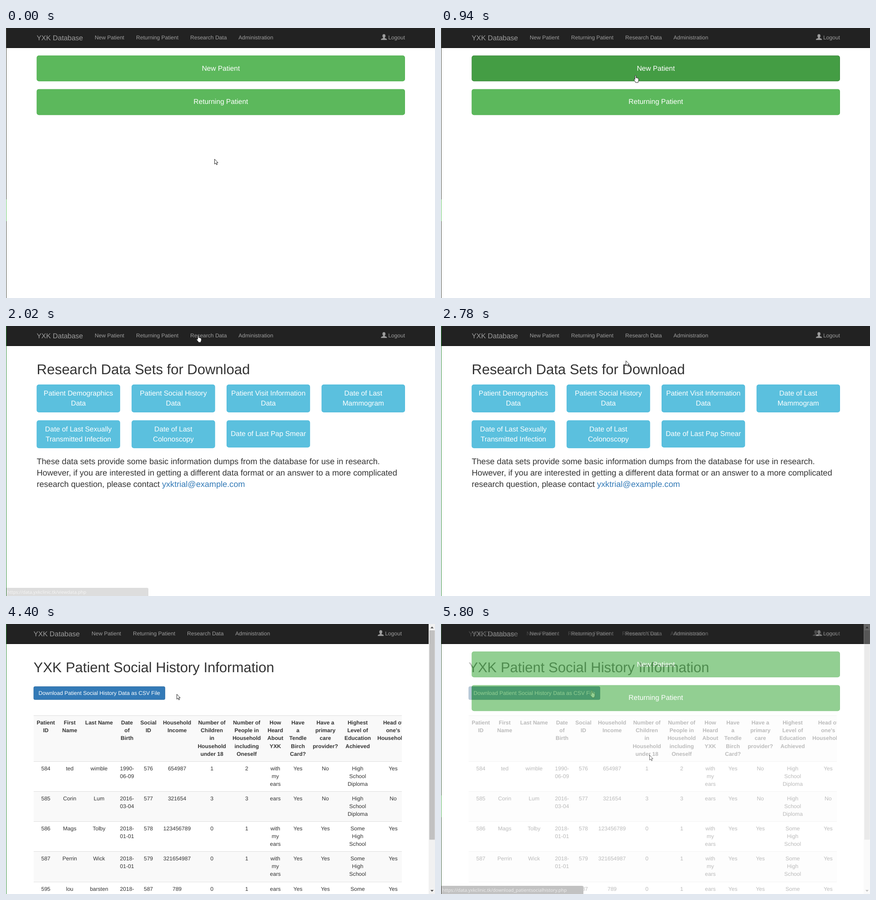
Recreate the animation shown at these times as an HTML page with a canvas. Size 943 px wide and 594 px high, loop 5870 ms.

```html
<!DOCTYPE html>
<html lang="en">
<head>
<meta charset="utf-8">
<title>Patient database</title>
<style>
  html, body { margin: 0; width: 100%; height: 100%; overflow: hidden; background: #fff; }
  canvas { display: block; }
</style>
</head>
<body>
<canvas id="stage" width="943" height="594"></canvas>
<script>
const W = 943, H = 594, LOOP = 5870;
const SANS = '"Liberation Sans", Arial, sans-serif';
const SMALL = 12.06, MEDIUM = 15.5, LEAD = 18.1, TITLE = 31;

const GREEN = ['#5cb85c', '#4cae4c', '#449d44', '#398439'];
const CYAN = ['#5bc0de', '#46b8da', '#31b0d5', '#269abc'];
const BLUE = ['#337ab7', '#2e6da4', '#286090', '#204d74'];

function context(canvas) {
  const c = canvas.getContext('2d');
  c.textRendering = 'geometricPrecision';
  return c;
}
const screen2d = context(document.getElementById('stage'));
const layerCanvas = document.createElement('canvas');
layerCanvas.width = W;
layerCanvas.height = H;
const layer = context(layerCanvas);
let g = screen2d;

function rect(x, y, w, h, color) {
  g.fillStyle = color;
  g.fillRect(x, y, w, h);
}

function text(str, x, y, size, color, align = 'left', weight = '', family = SANS) {
  g.font = `${weight} ${size}px ${family}`;
  g.textAlign = align;
  g.fillStyle = color;
  g.fillText(str, x, y);
}

// Paints a group on its own layer, then adds it with one opacity.
function blend(alpha, paint) {
  if (alpha <= 0) return;
  const below = g;
  g = layer;
  g.clearRect(0, 0, W, H);
  paint();
  g = below;
  g.globalAlpha = alpha;
  g.drawImage(layerCanvas, 0, 0);
  g.globalAlpha = 1;
}

const inside = (p, b) => p.x >= b.x && p.x < b.x + b.w && p.y >= b.y && p.y < b.y + b.h;

// ---- Page contents ----

const box = (x, y, w, h, palette, radius, size, lines) => ({ x, y, w, h, palette, radius, size, lines });
const info = (col, y, h, lines) => box(67.4 + col * 208.75, y, 183.4, h, CYAN, 5, MEDIUM, lines);

const pages = [
  {
    shift: 0,
    buttons: [
      box(67.4, 60.6, 809.6, 56.6, GREEN, 5, MEDIUM, [['New Patient', 94]]),
      box(67.4, 134.4, 809.6, 57, GREEN, 5, MEDIUM, [['Returning Patient', 167]])
    ]
  },
  {
    shift: 0,
    title: 'Research Data Sets for Download',
    buttons: [
      info(0, 128.8, 61.2, [['Patient Demographics', 153], ['Data', 175]]),
      info(1, 128.8, 61.2, [['Patient Social History', 153], ['Data', 175]]),
      info(2, 128.8, 61.2, [['Patient Visit Information', 153], ['Data', 175]]),
      info(3, 128.8, 61.2, [['Date of Last', 153], ['Mammogram', 175]]),
      info(0, 207.5, 61.2, [['Date of Last Sexually', 231.5], ['Transmitted Infection', 253.5]]),
      info(1, 207.5, 61.2, [['Date of Last', 231.5], ['Colonoscopy', 253.5]]),
      info(2, 207.5, 59.8, [['Date of Last Pap Smear', 242]])
    ]
  },
  {
    shift: -7,
    title: 'YXK Patient Social History Information',
    buttons: [
      box(60.5, 137.3, 289.4, 29.4, BLUE, 3.5, SMALL, [['Download Patient Social History Data as CSV File', 156]])
    ]
  }
];

const NAV = [['New Patient', 195], ['Returning Patient', 286], ['Research Data', 405], ['Administration', 511]];
const RESEARCH_LINK = { x: 392, y: 0, w: 106, h: 44 };

const COLUMNS = [87.5, 140, 204.5, 266, 313, 376, 452.5, 529, 592, 641.7, 702, 773, 851];
const HEADERS = [
  'Patient|ID', 'First|Name', 'Last Name', 'Date|of|Birth', 'Social|ID', 'Household|Income',
  'Number of|Children|in|Household|under 18', 'Number of|People in|Household|including|Oneself',
  'How|Heard|About|YXK', 'Have|a|Tendle|Birch|Card?', 'Have a|primary|care|provider?',
  'Highest|Level of|Education|Achieved', "Head of|one's|Household?"
];
const ROWS = [
  ['584', 'ted', 'wimble', '1990-|06-09', '576', '654987', '1', '2', 'with|my|ears', 'Yes', 'No', 'High|School|Diploma', 'Yes'],
  ['585', 'Corin', 'Lum', '2016-|03-04', '577', '321654', '3', '3', 'ears', 'Yes', 'No', 'High|School|Diploma', 'No'],
  ['586', 'Mags', 'Tolby', '2018-|01-01', '578', '123456789', '0', '1', 'with|my|ears', 'Yes', 'Yes', 'Some|High|School', 'Yes'],
  ['587', 'Perrin', 'Wick', '2018-|01-01', '579', '321654987', '0', '1', 'with|my|ears', 'Yes', 'Yes', 'Some|High|School', 'Yes'],
  ['595', 'lou', 'barsten', '2018-|01-01', '587', '789', '0', '1', 'ears', 'Yes', 'Yes', 'Some|High|School', 'Yes']
];

const SITE = 'https://data.yxkclinic.tk/';
const LINKS = ['viewdata.php', 'view_patientsocialhistory.php', 'download_patientsocialhistory.php'];

// ---- Drawing ----

function drawButton(b, hover) {
  const [fill, edge] = hover ? b.palette.slice(2) : b.palette;
  g.beginPath();
  g.roundRect(b.x, b.y, b.w, b.h, b.radius);
  g.fillStyle = edge;
  g.fill();
  g.beginPath();
  g.roundRect(b.x + 0.86, b.y + 0.86, b.w - 1.72, b.h - 1.72, b.radius - 0.86);
  g.fillStyle = fill;
  g.fill();
  for (const [line, y] of b.lines) text(line, b.x + b.w / 2, y, b.size, '#fff', 'center');
}

const userIcon = new Path2D(
  'M6.5 13.6C8.6 13.6 9.8 15 9.8 17.2C9.8 19 9 20.4 8.2 21.2V22' +
  'C9.4 22.9 13 23.4 13 25.2V26.3H0V25.2C0 23.4 3.6 22.9 4.8 22V21.2' +
  'C4 20.4 3.2 19 3.2 17.2C3.2 15 4.4 13.6 6.5 13.6Z');

function drawNav(shift, linkHover) {
  rect(0, 0, W, 44, '#222');
  rect(0, 43, W, 1, '#080808');
  const gray = '#9d9d9d';
  g.save();
  g.translate(shift, 0);
  text('YXK Database', 67.5, 27, MEDIUM, gray);
  for (const [label, x] of NAV) {
    text(label, x, 25, SMALL, linkHover && label === 'Research Data' ? '#fff' : gray);
  }
  text('Logout', 877, 25, SMALL, gray, 'right');
  g.translate(824.3, 0);
  g.fillStyle = gray;
  g.fill(userIcon);
  g.restore();
}

function drawCells(cells, top, weight) {
  cells.forEach((cell, col) => cell.split('|').forEach((line, i) =>
    text(line, COLUMNS[col], top + Math.round(i * 17.23), SMALL, '#333', 'center', weight)));
}

function drawTable() {
  const left = 60.5, width = 809.5, first = 302, pitch = 66.15;
  g.save();
  g.beginPath();
  g.rect(left, 200, width, H);
  g.clip();
  rect(left, 201, width, 101, '#f9f9f9');
  rect(left, 201, width, 1, '#ddd');
  drawCells(HEADERS, 221, 'bold');
  ROWS.forEach((row, i) => {
    const y = Math.round(first + i * pitch);
    if (i % 2) rect(left, y, width, pitch, '#f9f9f9');
    rect(left, y, width, 1, '#ddd');
    drawCells(row, y + 20, '');
  });
  g.restore();
}

function triangle(x, y, dy) {
  g.beginPath();
  g.moveTo(x - 3.5, y);
  g.lineTo(x + 3.5, y);
  g.lineTo(x, y + dy);
  g.fillStyle = '#505050';
  g.fill();
}

function drawScrollbar() {
  rect(929, 0, 14, H, '#f1f1f1');
  rect(930.5, 14, 12, 460.5, '#c1c1c1');
  triangle(936.5, 9.5, -4);
  triangle(936.5, 585, 4);
}

function drawIntro() {
  const lines = [
    'These data sets provide some basic information dumps from the database for use in research.',
    'However, if you are interested in getting a different data format or an answer to a more complicated',
    'research question, please contact '
  ];
  lines.forEach((line, i) => text(line, 67.5, 304 + i * 25, LEAD, '#333'));
  text('yxktrial@example.com', 343, 354, LEAD, '#337ab7');
}

function drawEdge(page) {
  rect(0, 0, 1, H, page ? '#2f8a35' : '#45483f');
  if (!page) rect(0, 377, 1, 48, '#62c562');
}

function drawStatus(url) {
  g.beginPath();
  g.roundRect(-4, 576, 317, 22, 3);
  g.fillStyle = '#4a4a4a';
  g.fill();
  text(url, 2.5, 589, 10, '#cfcfcf', 'left', '', '"Open Sans", "Noto Sans", sans-serif');
}

const arrow = new Path2D('M0 0V10.9L2.5 8.6L4.3 12.5L6 11.8L4.3 7.9H7.5Z');
const hand = new Path2D(
  'M-1.2 9V1.2Q-1.2 0 0 0T1.2 1.2V5.2Q2.4 4.4 3.2 5.6Q4.5 5 5 6.2Q6.8 5.8 6.8 7.6' +
  'V11Q6.8 12.6 5.8 13.6V15.5H.2V14.2L-3.2 10Q-3.8 8.6-2.8 8.2Q-2 8-1.2 9Z');

function drawCursor(p, pointing) {
  g.save();
  g.translate(Math.round(p.x) + 0.5, Math.round(p.y) + 0.5);
  const shape = pointing ? hand : arrow;
  g.fillStyle = '#fff';
  g.fill(shape);
  g.strokeStyle = '#111';
  g.lineWidth = 0.9;
  g.stroke(shape);
  g.restore();
}

// ---- Motion ----

const linear = u => u;
const swing = u => u - 0.05 * Math.sin(2 * Math.PI * u);
const speedUp = u => u ** 1.2;
const slowDown = u => 1 - (1 - u) ** 1.25;

// The pointer moves in discrete steps: first step, last step, count, goal.
const LEGS = [
  [260, 810, 10, 431, 131, swing],
  [870, 940, 2, 427, 104, linear],
  [1005, 1400, 7, 422, 20, slowDown],
  [2280, 2860, 10, 401, 93, speedUp],
  [2920, 3420, 9, 379, 155, slowDown],
  [4400, 4400, 1, 375, 154, linear],
  [4490, 4920, 8, 331, 146, linear]
];

function pointerAt(t) {
  const p = { x: 458, y: 288 };
  for (const [start, end, count, x, y, ease] of LEGS) {
    if (t < start) break;
    const gap = Math.max(1, (end - start) / Math.max(1, count - 1));
    const step = Math.min(count, Math.floor((t - start) / gap + 0.001) + 1);
    const u = ease(step / count);
    p.x += (x - p.x) * u;
    p.y += (y - p.y) * u;
  }
  return p;
}

const PAGE_STARTS = [[0, 0], [1650, 1], [3480, 2]];
const STATUS = [
  [0, 0], [1460, .4], [1520, .8], [1590, 1], [1920, .75], [1980, .5], [2020, .18], [2090, 0],
  [3231, .35], [3293, .7], [3356, 1], [3480, 0], [5040, .5], [5110, 1]
];
const FADE = [[0, 0], [5730, 1 / 3], [5800, 2 / 3]];

function held(track, t) {
  let value = track[0][1];
  for (const [start, v] of track) if (t >= start) value = v;
  return value;
}

function drawScene(t) {
  const index = held(PAGE_STARTS, t), page = pages[index];
  const p = pointerAt(t);
  const overLink = index < 2 && inside(p, RESEARCH_LINK);
  const justLoaded = t >= 1650 && t < 2280;
  const hovered = page.buttons.find(b => inside(p, b));

  rect(0, 0, W, H, '#fff');
  drawNav(page.shift, overLink && !justLoaded);
  if (page.title) text(page.title, 67.5 + page.shift, 105.5, TITLE, '#333');
  for (const b of page.buttons) drawButton(b, b === hovered);
  if (index === 1) drawIntro();
  if (index === 2) {
    drawTable();
    drawScrollbar();
  }
  drawEdge(index);
  const link = t < 2200 ? 0 : index;
  blend(held(STATUS, t), () => drawStatus(SITE + LINKS[link]));
  drawCursor(p, overLink || hovered);
}

function frame() {
  const t = performance.now() % LOOP;
  drawScene(t);
  blend(held(FADE, t), () => drawScene(0));
  requestAnimationFrame(frame);
}
frame();
</script>
</body>
</html>
```
